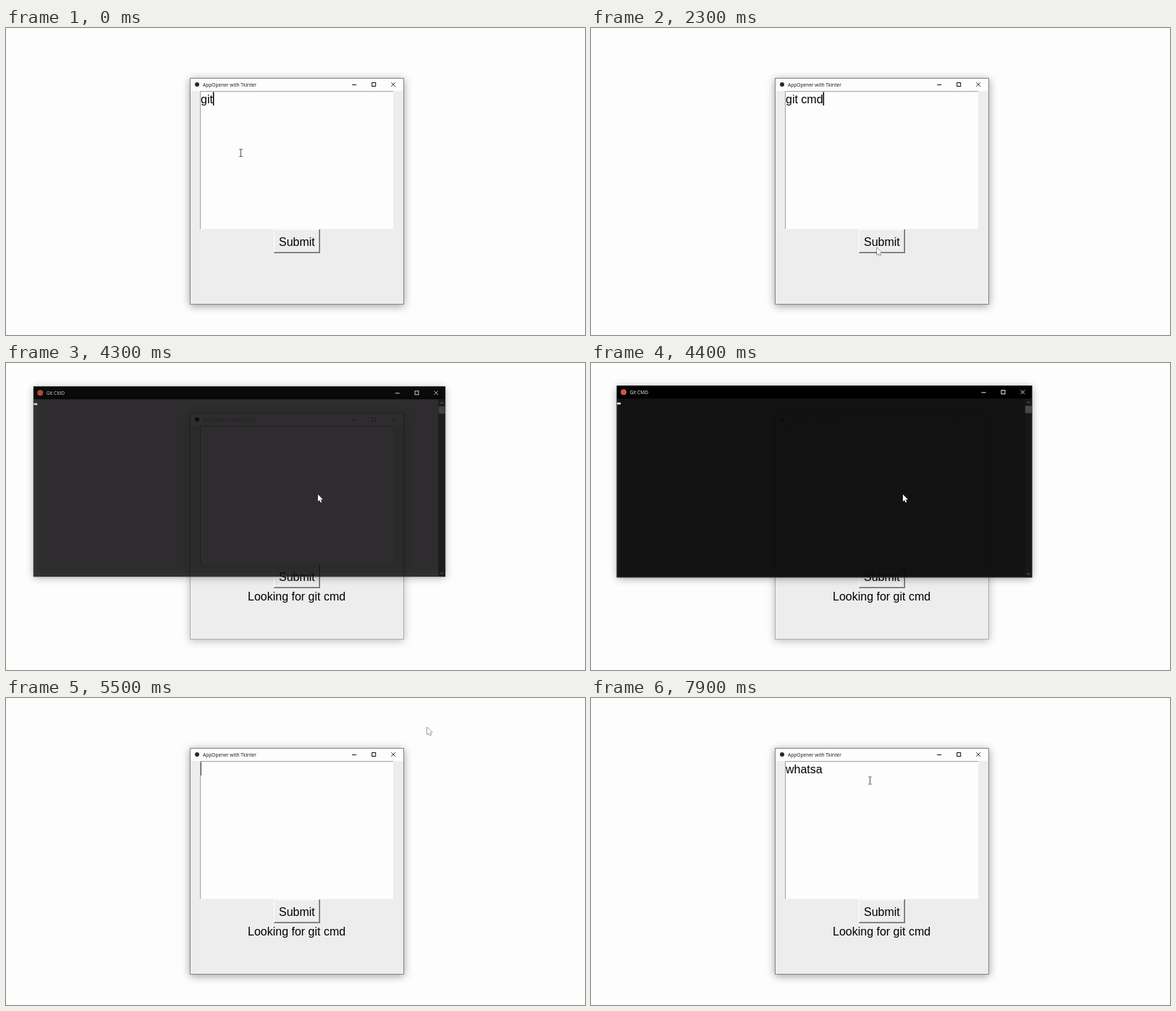
An HTML page with a canvas for the animation above (8000 ms loop, 800 by 424 pixels).

```html
<!DOCTYPE html>
<html lang="en">
<head>
<meta charset="utf-8">
<title>App opener demo</title>
<style>
  html, body { margin: 0; width: 100%; height: 100%; overflow: hidden; background: #fefdfe; }
  canvas { display: block; width: 100%; height: 100%; }
</style>
</head>
<body>
<canvas id="stage" width="800" height="424"></canvas>
<script>
const ctx = document.getElementById('stage').getContext('2d');
const LOOP = 8000, TICK = 100;
const ARIAL = '16px "Liberation Sans", Arial, sans-serif';
const TITLE = '6.62px "Open Sans", "Noto Sans", sans-serif';
const MONO = '7.86px "DejaVu Sans Mono", monospace';

// Each entry holds from its time until the next one.
const typed = [
  [0, 'git'], [200, 'git '], [600, 'git c'], [700, 'git cm'], [800, 'git cmd'], [3800, ''],
  [6200, 'w'], [6500, 'wh'], [7000, 'wha'], [7500, 'what'], [7700, 'whats'], [7900, 'whatsa']
];
const caretOn = [
  [0, true], [700, false], [1000, true], [1600, false], [1900, true], [4100, false], [5500, true],
  [6000, false], [6300, true], [6900, false], [7200, true], [7800, false]
];
// Pointer waypoints: time, x, y.
const pointerPath = [
  [0, 324.5, 172.5], [1400, 324.5, 172.5], [1900, 402, 325], [2100, 394, 304], [2200, 394, 304],
  [2300, 395, 303.5], [3000, 395, 303.5], [3300, 413, 227.5], [3500, 413, 227.5],
  [3600, 413, 223.5], [3700, 413, 223.5], [3900, 431, 181.5], [4700, 431, 181.5],
  [5400, 595.5, 37], [5500, 582, 40.5], [5600, 397, 111.5], [5700, 385.5, 114], [8000, 385.5, 114]
];

const held = (list, t) => list.filter(entry => entry[0] <= t).pop()[1];

function along(path, t) {
  const i = path.findIndex(point => point[0] > t);
  const [t0, x0, y0] = path[i - 1], [t1, x1, y1] = path[i];
  const k = (t - t0) / (t1 - t0);
  return [x0 + (x1 - x0) * k, y0 + (y1 - y0) * k];
}

function rect(x, y, w, h, color) {
  ctx.fillStyle = color;
  ctx.fillRect(x, y, w, h);
}

function text(string, x, y, font, color) {
  ctx.font = font;
  ctx.fillStyle = color;
  ctx.fillText(string, x, y);
}

function line(points, color, width = 1, close = false) {
  ctx.beginPath();
  points.forEach(([x, y]) => ctx.lineTo(x, y));
  if (close) ctx.closePath();
  ctx.strokeStyle = color;
  ctx.lineWidth = width;
  ctx.stroke();
}

function dot(x, y, r, color) {
  ctx.beginPath();
  ctx.arc(x, y, r, 0, Math.PI * 2);
  ctx.fillStyle = color;
  ctx.fill();
}

function panel(x, y, w, h, color, border, shadow) {
  ctx.save();
  ctx.shadowColor = `rgba(0,0,0,${shadow})`;
  ctx.shadowBlur = 11;
  ctx.shadowOffsetY = 2;
  rect(x, y, w, h, color);
  ctx.restore();
  ctx.strokeStyle = border;
  ctx.lineWidth = 1;
  ctx.strokeRect(x + .5, y + .5, w - 1, h - 1);
}

// Minimise, maximise and close glyphs, spaced 27 px apart.
function windowButtons(closeX, y, color) {
  const maxX = closeX - 27, minX = closeX - 54;
  line([[minX - 3, y + .5], [minX + 3, y + .5]], color);
  ctx.strokeRect(maxX - 2.5, y - 2.5, 5, 5);
  line([[closeX - 2.8, y - 2.8], [closeX + 2.8, y + 2.8]], color, .9);
  line([[closeX - 2.8, y + 2.8], [closeX + 2.8, y - 2.8]], color, .9);
}

function drawApp(t) {
  const active = t < 4100 || t >= 5500;
  const ink = active ? '#111' : '#999';
  panel(254, 69, 296, 313, '#eeedee', active ? '#858585' : '#adadad', active ? .38 : .26);
  rect(255, 70, 294, 17, '#fefdfe');
  dot(264, 78, 3, '#1c2a38');
  text('AppOpener with Tkinter', 272, 80.5, TITLE, ink);
  windowButtons(535.2, 78, ink);

  rect(268, 87, 267, 190.5, '#fefdfe');
  rect(268, 87, 267, 1, '#a3a2a3');
  rect(268, 87, 1, 190.5, '#a3a2a3');
  const entry = held(typed, t);
  text(entry, 269, 104, ARIAL, '#000');
  if (held(caretOn, t)) {
    const x = 269 + ctx.measureText(entry).width;
    rect(x, 88.5, entry ? 1.5 : 1, 18.5, entry ? '#000' : '#555');
  }

  rect(370, 278, 64, 33, '#6b6a6b');
  rect(370, 278, 63, 32, '#fff');
  rect(371, 279, 62, 31, '#a3a2a3');
  rect(371, 279, 61, 30, '#eeedee');
  text('Submit', 377, 300.5, ARIAL, '#000');
  if (t >= 3800) text('Looking for git cmd', 334, 328, ARIAL, '#000');
}

function drawConsole(t, hoverClose) {
  if (t < 4300 || t >= 5500) return;
  const [scale, alpha] = t < 4400 ? [.99, .79] : t < 4500 ? [.998, .95] : [1, 1];
  ctx.save();
  ctx.globalAlpha = alpha;
  ctx.translate(322.5, 163.5);
  ctx.scale(scale, scale);
  ctx.translate(-322.5, -163.5);
  panel(35, 31, 575, 265.5, '#0c0b0c', '#303030', .4);
  rect(35.5, 31.5, 574, 17.5, '#000');
  dot(44.5, 40, 4, '#dc5a47');
  text('Git CMD', 53, 42.5, TITLE, '#fff');
  if (hoverClose) rect(584, 31, 26, 17.5, '#a00d1b');
  windowButtons(597, 40, '#fff');

  rect(600, 49, 9.5, 247, '#191819');
  rect(600.5, 59, 9, 10, '#4d4c4d');
  line([[603, 55], [605, 53], [607, 55]], '#8a8a8a');
  line([[603, 290.5], [605, 292.5], [607, 290.5]], '#8a8a8a');
  if (t < 4500) {
    rect(35.5, 54.5, 5, 2.5, '#fff');
  } else {
    text('C:\\Users\\nilva>', 35, 63.5, MONO, '#ececec');
    if (t < 4900) rect(106, 64, 4.5, 1.5, '#ececec');
  }
  ctx.restore();
}

function drawPointer(t, x, y) {
  ctx.save();
  ctx.translate(x, y);
  if (t < 1800 || t >= 5600) {
    line([[0, -4.5], [0, 4.5]], '#555');
    line([[-2.3, -5], [2.3, -5]], '#666');
    line([[-2.3, 5], [2.3, 5]], '#666');
  } else {
    const arrow = [[0, 0], [0, 9.8], [2.2, 7.8], [3.8, 11.2], [5.3, 10.5], [3.8, 7.2], [6.8, 7]];
    line(arrow, '#222', .9, true);
    ctx.fillStyle = '#fff';
    ctx.fill();
  }
  ctx.restore();
}

const start = performance.now();

function frame() {
  const elapsed = (performance.now() - start) % LOOP;
  const t = Math.floor(elapsed / TICK) * TICK;
  const [x, y] = along(pointerPath, t);
  rect(0, 0, 800, 424, '#fefdfe');
  drawApp(t);
  drawConsole(t, x >= 584 && y < 49);
  drawPointer(t, x, y);
  requestAnimationFrame(frame);
}
frame();
</script>
</body>
</html>
```
